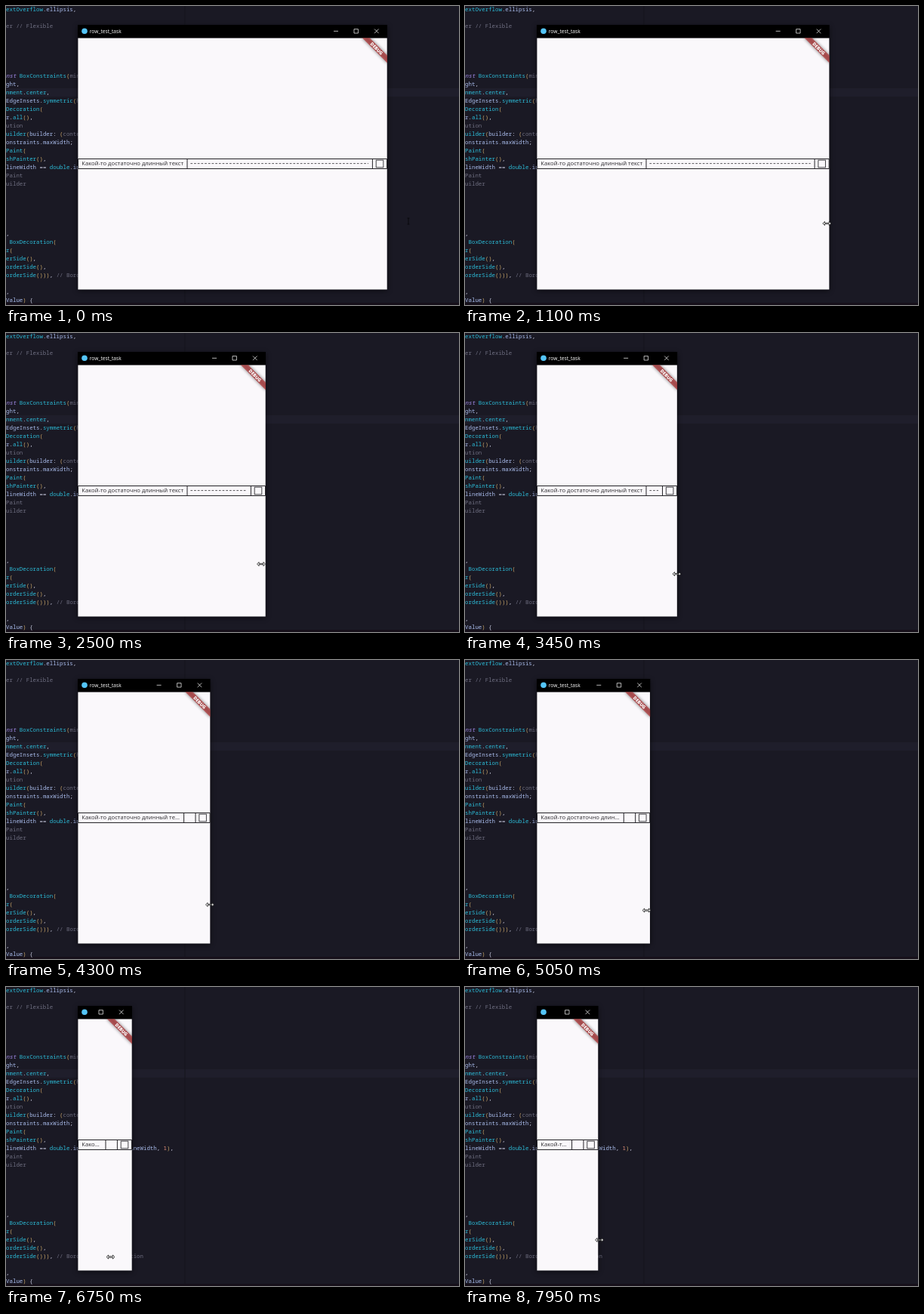
An HTML page for the animation above (8000 ms loop, 600 px wide and 396 px high).

```html
<!DOCTYPE html>
<html lang="ru">
<head>
<meta charset="utf-8">
<title>row_test_task</title>
<style>
html, body { margin: 0; width: 100%; height: 100%; overflow: hidden; background: #1a1924; }
svg { display: block; width: 600px; height: 396px; }
text { white-space: pre; }
.code { font: 500 7.4px "Noto Sans Mono", monospace; }
.ui { font-family: "Open Sans", sans-serif; }
.line { fill: none; stroke: #242327; stroke-width: 1; }
.icon { fill: none; stroke: #f0f0f0; stroke-width: .75; }
</style>
</head>
<body>
<svg viewBox="0 0 600 396">
  <defs>
    <filter id="soft" x="-20%" y="-20%" width="140%" height="140%"><feGaussianBlur stdDeviation="3.5"/></filter>
    <filter id="blur" x="-30%" y="-200%" width="160%" height="500%"><feGaussianBlur stdDeviation="2"/></filter>
    <clipPath id="content"><rect id="clip" x="95" y="42.3" height="333"/></clipPath>
  </defs>

  <rect width="600" height="396" fill="#1a1924"/>
  <rect y="109" width="600" height="11" fill="#1f1e2b"/>
  <path d="M237 0V393" stroke="#15141d"/>
  <rect y="393" width="600" height="3" fill="#16101a"/>
  <g id="code" class="code"></g>

  <rect id="shadow" x="95" y="27" height="350" fill="#000" opacity=".55" filter="url(#soft)"/>
  <rect id="body" x="95.4" y="42.3" height="333.2" fill="#faf8fb"/>
  <rect id="bar" x="95" y="25" height="17.3" fill="#000"/>
  <circle cx="104" cy="33.3" r="3.8" fill="#54c5f8"/>
  <text id="title" class="ui" x="110.8" y="35.9" font-size="6.65" fill="#fff"></text>

  <path id="row" class="line"/>
  <path id="dashes" class="line" stroke-dasharray="2.7 1.99" style="stroke:#444347;stroke-width:.9"/>
  <text id="label" class="ui" x="100.3" y="211.3" font-size="7.7" fill="#2a292c"></text>

  <!-- parts anchored to the right edge of the window -->
  <g id="right">
    <path id="minimize" class="icon" d="M-71 33.3h6"/>
    <path class="icon" d="M-44 30.6h5.4v5.4h-5.4zM-17 30.5l5.6 5.6m0-5.6l-5.6 5.6"/>
    <rect class="line" x="-14.8" y="204.2" width="9.6" height="9.6" style="stroke:#444347"/>
  </g>
  <g clip-path="url(#content)">
    <g id="banner">
      <rect x="-23.5" y="16.4" width="47" height="7" fill="#000" opacity=".5" filter="url(#blur)"/>
      <rect x="-23.5" y="16.4" width="47" height="7" fill="#b22a2b" opacity=".66"/>
      <text class="ui" y="22.1" font-size="6" font-weight="800" fill="#fff" text-anchor="middle">DEBUG</text>
    </g>
  </g>

  <path id="beam" d="M-1.5-4h3M0-4v8M-1.5 4h3" fill="none" stroke="#08080c"/>
  <path id="resize" d="M-5.5 0l2.6-2.5v1.8h5.8v-1.8L5.5 0l-2.6 2.5V.7h-5.8v1.8z" fill="#fff" stroke="#111" stroke-width=".8"/>
</svg>
<script>
const LOOP = 8000, STEP = 50, LAG = 50;
const LEFT = 95, MIN_EDGE = 167, MAX_EDGE = 505;
const LABEL = "Какой-то достаточно длинный текст";
const TITLE = "row_test_task";
const CODE = `extOverflow.ellipsis,

er // Flexible





nst BoxConstraints(min
ght,
nment.center,
EdgeInsets.symmetric(h
Decoration(
r.all(),
ution
uilder(builder: (contex
onstraints.maxWidth;
Paint(
shPainter(),
lineWidth == double.infinity ? mx : lineWidth, 1),
Paint
uilder





,
 BoxDecoration(
r(
erSide(),
orderSide(),
orderSide())), // Border // BoxDecoration

,
Value) {`;

const el = {};
document.querySelectorAll("[id]").forEach(e => el[e.id] = e);

// the first pattern that matches gives a token its colour
const SYNTAX = [
  [/^(\w+$|\w+ \/\/|\/\/).*/, "#6e6e80"],
  [/^nst\b/, "#a08ae6"],
  [/^(\w+(?=\()|double|nment|center|extOverflow)/, "#2cbcd8"],
  [/^\d+/, "#e8917c"],
  [/^[A-Za-z]+/, "#a9bcec"],
  [/^[()]+/, "#c9a568"],
  [/^[^\w()\/]+/, "#c8cadf"]
];

const svgNode = (name, parent, attrs) => {
  const n = document.createElementNS("http://www.w3.org/2000/svg", name);
  for (const k in attrs) n.setAttribute(k, attrs[k]);
  return parent.appendChild(n);
};

CODE.split("\n").forEach((src, row) => {
  const line = svgNode("text", el.code, { x: 0.1, y: 6.8 + row * 11 });
  while (src) {
    const [pattern, fill] = SYNTAX.find(([p]) => p.test(src));
    const token = src.match(pattern)[0];
    const span = svgNode("tspan", line, { fill });
    if (token === "nst") span.setAttribute("font-style", "italic");
    span.textContent = token;
    src = src.slice(token.length);
  }
});

// turning points of the pointer: time, x, y
const POINTER = [
  [0, 533, 285], [200, 506, 284], [700, 506, 284], [1600, 446, 293],
  [2500, 338, 306], [3250, 283, 318], [4300, 270, 324], [4950, 250, 329],
  [5850, 165, 352], [6650, 135, 360], [7500, 165, 339], [7950, 178, 335]
];

function pointerAt(t) {
  const i = Math.max(1, POINTER.findIndex(p => p[0] >= t));
  const [t0, x0, y0] = POINTER[i - 1], [t1, x1, y1] = POINTER[i];
  const k = Math.max(0, (t - t0) / (t1 - t0));
  return [x0 + (x1 - x0) * k, y0 + (y1 - y0) * k];
}

// the dragged edge trails the pointer and stops at the smallest width
const edgeAt = t => Math.min(MAX_EDGE, Math.max(MIN_EDGE, pointerAt(t - LAG)[0]));

const pen = document.createElement("canvas").getContext("2d");
function fit(text, size, room) {
  // measured large to avoid rounding of small sizes
  pen.font = '100px "Open Sans", sans-serif';
  const width = s => pen.measureText(s).width * size / 100;
  if (width(text) <= room) return text;
  let n = text.length - 1;
  while (n > 0 && width(text.slice(0, n) + "…") > room) n--;
  return n > 0 ? text.slice(0, n).trimEnd() + "…" : "";
}

const show = (e, on) => e.setAttribute("visibility", on ? "visible" : "hidden");
const move = (e, x, y, extra = "") => e.setAttribute("transform", `translate(${x} ${y})${extra}`);

function draw(t) {
  const edge = edgeAt(t);
  for (const e of [el.shadow, el.bar, el.clip]) e.setAttribute("width", edge - LEFT);
  el.body.setAttribute("width", edge - LEFT - 0.7);
  move(el.right, edge, 0);
  move(el.banner, edge, 42.3, " rotate(45)");
  show(el.minimize, edge > 178);
  el.title.textContent = fit(TITLE, 6.65, edge - 195);

  const split = Math.min(240, edge - 35), box = edge - 19.6;
  el.row.setAttribute("d",
    `M95.5 202.5H${edge - 0.5}V215.5H95.5ZM${split} 202.5V215.5M${box} 202.5V215.5`);
  el.label.textContent = split < 240 ? fit(LABEL, 7.7, split - 104.5) : LABEL;
  show(el.dashes, split >= 240);
  el.dashes.setAttribute("d", `M244.4 208.6H${box - 5.4}`);

  const [x, y] = pointerAt(t);
  const onEdge = x <= 511;
  show(el.beam, !onEdge);
  show(el.resize, onEdge);
  move(onEdge ? el.resize : el.beam, x, y);
}

const start = performance.now();
function tick() {
  const t = (performance.now() - start) % LOOP;
  draw(Math.floor(t / STEP) * STEP);
  requestAnimationFrame(tick);
}
tick();
</script>
</body>
</html>
```
